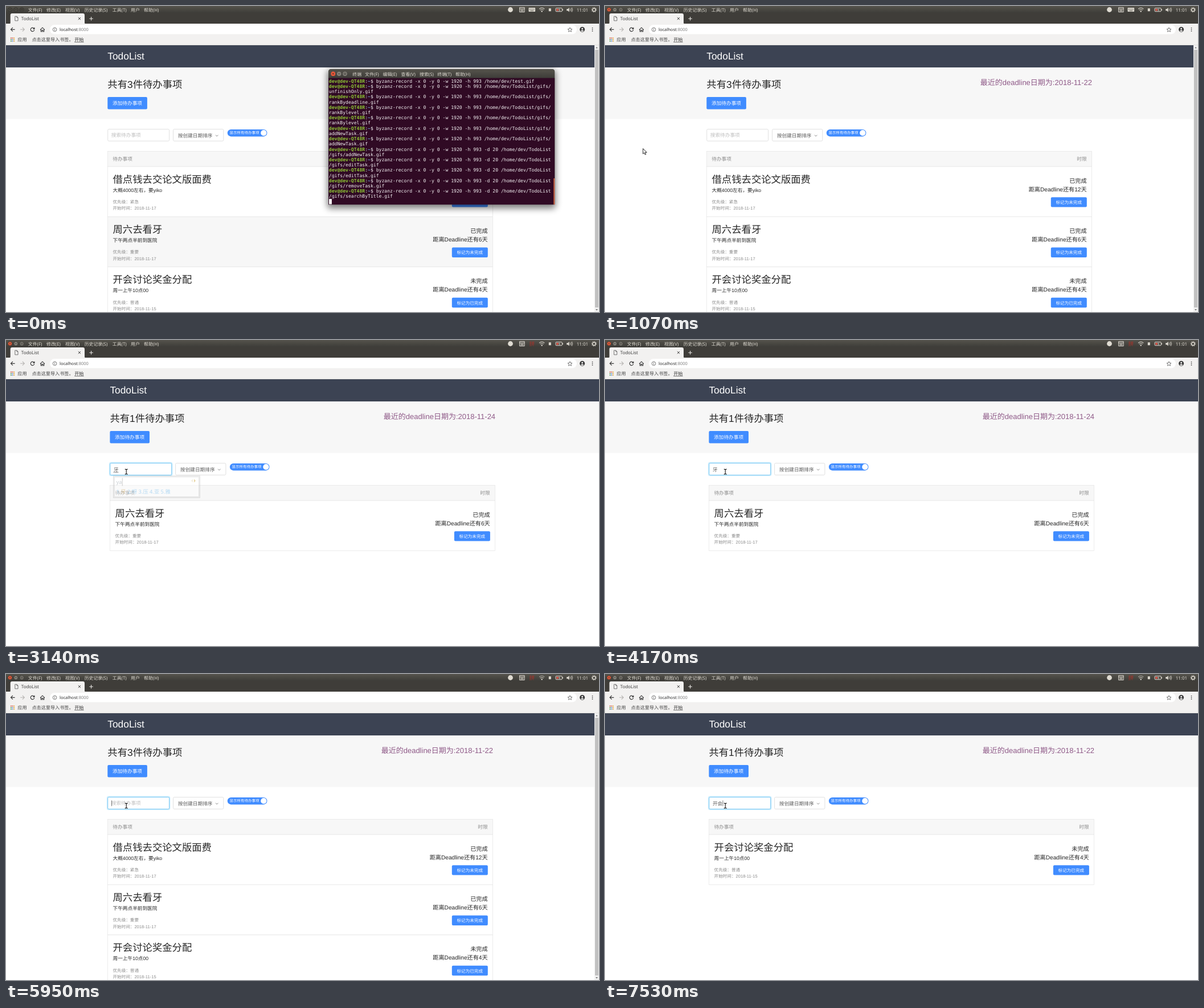
Write an HTML page that moves like this. It is 1041 px wide and 538 px high and loops after 8000 ms.

```html
<!DOCTYPE html>
<html lang="zh-CN">
<head>
<meta charset="utf-8">
<title>TodoList</title>
<style>
html, body { margin: 0; width: 100%; height: 100%; overflow: hidden; background: #fff; }
svg { display: block; width: 100vw; height: 100vh; }
text { white-space: pre; text-rendering: geometricPrecision; font-family: "Liberation Sans", "Noto Sans CJK SC", sans-serif; }
.ui { font-family: "Noto Sans", "Noto Sans CJK SC", sans-serif; }
.mono { font-family: "DejaVu Sans Mono", monospace; }
</style>
</head>
<body>
<svg viewBox="0 0 1041 538" preserveAspectRatio="none">
<defs>
  <linearGradient id="bar" x2="0" y2="1"><stop stop-color="#55534c"/><stop offset="1" stop-color="#3d3c38"/></linearGradient>
  <filter id="blur" x="-10%" y="-15%" width="120%" height="130%"><feGaussianBlur stdDeviation="6"/></filter>
</defs>
<g id="page"></g><g id="frame"></g><g id="tray"></g><g id="term"></g><g id="over"></g>
</svg>
<script>
const LOOP = 8000;
const BLUE = '#408cff', INK = '#262626', GREY = '#8c8c8c', LIGHT = '#dfdbd2';
const $ = id => document.getElementById(id);

const rect = (x, y, w, h, fill, more = '') =>
  `<rect x="${x}" y="${y}" width="${w}" height="${h}" fill="${fill}" ${more}/>`;
const circle = (x, y, r, fill, more = '') =>
  `<circle cx="${x}" cy="${y}" r="${r}" fill="${fill}" ${more}/>`;
const line = (d, stroke, width = 1, more = '') =>
  `<path d="${d}" fill="none" stroke="${stroke}" stroke-width="${width}" ${more}/>`;
const text = (x, y, size, fill, str, more = '') =>
  `<text x="${x}" y="${y}" font-size="${size}" fill="${fill}" ${more}>${str}</text>`;
const END = 'text-anchor="end"', UI = 'class="ui"';
const clamp = v => Math.max(0, Math.min(1, v));
const between = (t, a, b) => t >= a && t < b;

const tasks = [
  { title: '借点钱去交论文版面费', note: '大概4000左右，要yiko', level: '紧急', start: '2018-11-17', done: true, days: 12 },
  { title: '周六去看牙', note: '下午两点半前到医院', level: '重要', start: '2018-11-17', done: true, days: 6 },
  { title: '开会讨论奖金分配', note: '周一上午10点00', level: '普通', start: '2018-11-15', done: false, days: 4 }
];

// What the search box holds over time; `pre` marks unfinished input.
const inputs = [
  { at: 0, word: '', show: [0, 1, 2] },
  { at: 3090, word: '牙', show: [1], pre: true },
  { at: 3640, word: '牙', show: [1] },
  { at: 5050, word: '', show: [0, 1, 2] },
  { at: 6560, word: '看', show: [1], pre: true },
  { at: 6890, word: '开', show: [2], pre: true },
  { at: 7210, word: '开会', show: [2], pre: true },
  { at: 7480, word: '开会', show: [2] }
];
const carets = [[2780, 3090], [3680, 4170], [4780, 5370], [5950, 6560], [7505, 8000]];
const popups = [
  { from: 3090, to: 3680, x: 188, y: 238.5, w: 152, key: 'ya', list: '牙 呀 压 亚 雅', fadeIn: 1, fadeOut: 1 },
  { from: 6560, to: 6890, x: 184.5, y: 237, w: 150.5, key: 'k', list: '看 库 可 框 拷', fadeIn: 1 },
  { from: 6890, to: 7060, x: 188, y: 238.5, w: 152, key: 'kai', list: '开 凯 慨 楷 揩' },
  { from: 7060, to: 7530, x: 188, y: 238.5, w: 195, key: "kai'hui", list: '开会 开回 开 凯 慨', fadeOut: 1 }
];

function row(task, y, fill) {
  const a = tasks.indexOf(task);
  return rect(178.5, y, 676, 88.3, fill, 'stroke="#e4e4e4" stroke-width=".7"') +
    text(187.5, y + 28.5, 17.35, INK, task.title) +
    text(187.5, y + 44.3, 8.67, INK, task.note) +
    text(187.5, y + 64.9, 7.59, GREY, '优先级：' + task.level) +
    text(187.5, y + 76.2, 7.59, GREY, '开始时间：' + task.start) +
    text(845.6, y + 28.3, 10.15, INK, task.done ? '已完成' : '未完成', END) +
    text(845.6, y + 43.3, 10.15, INK, `距离Deadline还有${task.days}天`, END) +
    rect(782.8, y + 54, 63, 17.4, BLUE, 'rx="2"') +
    text(791.5, y + 65.9, 7.59, '#fff', task.done ? '标记为未完成' : '标记为已完成');
}

function page(t) {
  const now = inputs.filter(i => i.at <= t).pop();
  const full = now.show.length > 1;
  const wide = full ? 1033 : 1041;
  const hover = t > 1700, focus = t >= 2550;
  const day = now.show.includes(2) ? 22 : 24;
  const shade = Math.round(247 + 8 * clamp((t - 720) / 210));

  let s = rect(0, 69, 1041, 469, '#fff') + rect(0, 69, wide, 39, '#3c4353') + rect(0, 108, wide, 90.6, '#f7f7f7');
  s += `<g transform="translate(${full ? 0 : 4.1} 0)">`;
  s += text(178.3, 94.4, 17.35, '#fff', 'TodoList') +
    text(178.3, 144.4, 17.35, INK, `共有${now.show.length}件待办事项`) +
    rect(178.3, 160, 69.6, 21.6, BLUE, 'rx="2"') + text(187, 174.4, 8.67, '#fff', '添加待办事项');
  if (t >= 1070) s += text(855, 139.2, 13.01, '#8f5a88', `最近的deadline日期为:2018-11-${day}`, END);

  if (focus) s += rect(177.6, 215.6, 110, 22.8, 'none', 'rx="2.6" stroke="#2db7f5" stroke-opacity=".25" stroke-width="1.6"');
  s += rect(178.7, 216.6, 107.9, 20.8, '#fff', `rx="2" stroke="${hover ? '#57b9f0' : '#d9d9d9'}" stroke-width=".8"`);
  s += now.word ? text(184.8, 230.5, 8.67, '#595959', now.word) : text(184.8, 230.3, 8.67, '#bfbfbf', '搜索待办事项');
  if (now.pre) s += rect(184.4, 232.3, 8.9 * now.word.length, .7, '#555');
  if (carets.some(c => between(t, ...c))) s += rect(185 + 8.75 * now.word.length, 222.3, .7, 10, '#444');

  s += rect(293.5, 216.6, 88.3, 20.8, '#fff', 'rx="2" stroke="#d9d9d9" stroke-width=".8"') +
    text(301.9, 230.6, 8.67, '#595959', '按创建日期排序') +
    line('M368 226.7l2.2 2.4 2.2-2.4', '#777', .8) +
    rect(388.8, 217, 69.6, 12.4, BLUE, 'rx="6.2"') + text(392.5, 225.4, 6.5, '#fff', '显示所有待办事项') +
    circle(452.3, 223.2, 5.1, '#fff');

  s += rect(178.5, 255.3, 676, 26.9, '#f7f7f7', 'stroke="#e4e4e4" stroke-width=".7"') +
    text(187.3, 271.5, 8.67, GREY, '待办事项') + text(845.6, 271.5, 8.67, GREY, '时限', END);
  now.show.forEach((n, i) => {
    const tone = full && n === 1 && t < 930 ? shade : 255;
    s += row(tasks[n], 282.2 + 88.3 * i, `rgb(${tone},${tone},${tone})`);
  });
  s += '</g>';
  if (full) s += rect(1033, 69, 8, 469, '#f1f1f1') + rect(1034, 77, 6, 453, '#c1c1c1') +
    '<path d="M1035 74.3l2-2.4 2 2.4zM1035 533l2 2.4 2-2.4z" fill="#777"/>';
  return s;
}

function menu(xs, y, names) {
  return names.map((n, i) => text(xs[i], y, 7.9, LIGHT, n, UI)).join('');
}

function frame() {
  let s = rect(0, 0, 1041, 31.5, '#3f3d39') + rect(0, 0, 1041, 12.5, 'url(#bar)');
  s += menu([38.8, 71, 104, 137.7, 186.8, 219, 242], 9.9,
    ['文件(F)', '修改(E)', '视图(V)', '历史记录(S)', '工具(T)', '用户', '帮助(H)']);
  s += '<path d="M6 31.5q1.7 0 1.7-2V16q0-3 3-3H135q3 0 3 3v13.5q0 2 1.7 2z" fill="#f2f1f0"/>' +
    rect(0, 31, 1041, 38, '#f2f1f0') + rect(77, 33, 925, 16.6, '#fff', 'rx="8.3"') + rect(0, 68.4, 1041, .6, '#d8d6d3');
  s += line('M15.8 18.3h3.2l2 2v5.6h-5.2zM19 18.3v2h2', '#555', .8) +
    text(26.8, 24.9, 7.9, '#3c3c3c', 'TodoList', UI) +
    line('M126.8 20l4.2 4.2m0-4.2l-4.2 4.2', '#444', 1) + line('M146.3 22.2h6.6m-3.3-3.3v6.6', '#e8e6e2', 1.1);
  s += line('M15.6 41.3H8.6m3.3-3.4l-3.4 3.4 3.4 3.4', '#3a3a3a', 1.2) +
    line('M25.2 41.3h7m-3.3-3.4l3.4 3.4-3.4 3.4', '#b5b3b0', 1.1) +
    line('M49.2 39.4A3.3 3.3 0 1 0 49.8 42M49.9 37.7v2.6h-2.6', '#3a3a3a', 1.2) +
    line('M60 41.8l4-3.9 4 3.9M61.3 41v4h1.8v-2.4h1.8V45h1.8v-4', '#3a3a3a', 1.1);
  s += circle(85.6, 41.4, 3.3, 'none', 'stroke="#555" stroke-width=".8"') +
    rect(85.2, 40.9, .8, 2.3, '#555') + rect(85.2, 39.3, .8, .9, '#555') +
    text(94, 44.3, 7.5, '#2b2b2b', 'localhost<tspan fill="#808080">:8000</tspan>', UI);
  s += line('M990 37.8l1.1 2.6 2.8.2-2.1 1.9.6 2.8-2.4-1.5-2.4 1.5.6-2.8-2.1-1.9 2.8-.2z', '#555', .8) +
    circle(1011.6, 41.3, 4.5, '#3c3c3c') + circle(1011.6, 40, 1.5, '#f2f1f0') +
    '<path d="M1008.8 43.9q2.8-2.6 5.6 0q-2.8 2.2-5.6 0" fill="#f2f1f0"/>';
  for (let i = 0; i < 3; i++) s += circle(1029.5, 38.5 + 2.8 * i, .85, '#444');
  const dots = ['#d9503f', '#d9503f', '#e5a52f', '#4a9a55', '#5585d8', '#e5a52f', '#4a9a55', '#5585d8', '#e5a52f'];
  dots.forEach((c, i) => s += rect(8 + 2.7 * (i % 3), 55.5 + 2.7 * (i / 3 | 0), 1.7, 1.7, c));
  s += text(20.3, 61.9, 8.15, '#444', '应用', UI) + text(45.4, 61.9, 8.15, '#444', '点击这里导入书签。', UI) +
    text(120.2, 61.9, 8.15, '#333', '开始', UI) + rect(120.2, 63, 16.4, .7, '#444');
  return s;
}

function tray(t) {
  const live = t >= 1070;
  let s = '';
  [7, 17.3, 27.7].forEach((x, i) => {
    const fill = live ? (i ? '#85827a' : '#ea5d3c') : '#4b4943';
    s += circle(x, 6.4, 3.6, fill, 'stroke="#2f2e2a" stroke-width=".7"');
    const mark = [`M${x - 1.3} 5.1l2.6 2.6m0-2.6l-2.6 2.6`, `M${x - 1.6} 6.4h3.2`, `M${x - 1.4} 5.2h2.8v2.4h-2.8z`][i];
    s += line(mark, live ? '#3b3935' : '#34332f', .8);
  });
  s += circle(885.5, 6.5, 4.4, LIGHT);
  s += line('M901.6 2.6h8.6v8h-8.6zM901.6 5h8.6M903.2 7h5.4M903.2 8.8h5.4', LIGHT, 1);
  if (t < 2550) {
    s += rect(917.5, 3, 11.6, 7, LIGHT, 'rx="1"');
    s += line('M918.8 5h9M918.8 6.7h9', '#55534c', .8, 'stroke-dasharray="1 .7"') + rect(920.5, 8, 5.6, .8, '#55534c');
  } else s += text(918.6, 10.2, 9.6, '#a8322a', '拼', UI);
  s += line('M936 5.3q4.7-4 9.4 0', LIGHT, 1.1, `opacity="${t < 5770 ? 1 : .65}"`) +
    line('M937.7 7.3q3-2.7 6 0', LIGHT, 1.1) + circle(940.7, 9.4, 1.2, LIGHT);
  s += rect(952.8, 4.2, 4, 5, LIGHT);
  s += rect(965, 3.7, 11.2, 6, 'none', `rx="1" stroke="${LIGHT}" stroke-width="1"`) +
    rect(976.7, 5.4, 1.2, 2.6, LIGHT) + rect(966.4, 5, 3.4, 3.4, '#e0564a') +
    line('M971.8 4.8l-1.3 2.1h2.2l-1.2 2', LIGHT, .8);
  s += `<path d="M984.2 5.2h2l2.5-2.3v7.6l-2.5-2.3h-2z" fill="${LIGHT}"/>` +
    line('M990.1 4.9q1.3 1.8 0 3.6M991.8 3.7q2.2 3 0 6M993.4 2.8q2.6 3.9 0 7.8', LIGHT, .8);
  s += text(1001.8, 9.5, 7.9, LIGHT, '11:01', UI);
  s += circle(1032.3, 6.7, 2.6, 'none', `stroke="${LIGHT}" stroke-width="1.3"`) +
    circle(1032.3, 6.7, 3.8, 'none', `stroke="${LIGHT}" stroke-width="1.3" stroke-dasharray="1.5 1.48"`);
  return s;
}

function terminal(t) {
  if (t >= 1070) return '';
  let s = rect(564, 113, 401, 243, '#000', 'rx="5" opacity=".5" filter="url(#blur)"') +
    '<path d="M566 349V115.5q0-4.5 4.5-4.5H958.7q4.5 0 4.5 4.5V349z" fill="#3d3c38"/>' +
    rect(566.4, 111.4, 396.4, 15.6, 'url(#bar)', 'rx="4"') + rect(566, 126.6, 397.2, 222.6, '#300a24');
  s += circle(574.3, 119.2, 3.9, '#e9593b') + line('M572.9 117.8l2.8 2.8m0-2.8l-2.8 2.8', '#4a2a20', .9);
  s += circle(584.7, 119.2, 3.8, '#85827a') + line('M583 119.2h3.4', '#3b3935', .9);
  s += circle(595, 119.2, 3.8, '#85827a') + line('M593.5 117.9h3v2.6h-3z', '#3b3935', .8);
  s += menu([608.3, 630, 661.5, 693.6, 726, 757.3, 789], 123.2,
    ['终端', '文件(F)', '编辑(E)', '查看(V)', '搜索(S)', '终端(T)', '帮助(H)']);

  const prompt = '<tspan font-weight="bold" fill="#8ec635">dev@dev-QT48R</tspan>:' +
    '<tspan font-weight="bold" fill="#729fcf">~</tspan>$ byzanz-record -x 0 -y 0 -w 1920 -h 993 ';
  const home = '/home/dev/';
  const lines = [prompt + home + 'test.gif'];
  ['unfinishOnly', 'rankBydeadline', 'rankBylevel', 'rankBylevel', 'addNewTask', 'addNewTask']
    .forEach(n => lines.push(prompt + home + 'TodoList/gifs/', n + '.gif'));
  ['addNewTask', 'editTask', 'editTask', 'removeTask', 'searchByTitle']
    .forEach(n => lines.push(prompt + '-d 20 ' + home + 'TodoList', '/gifs/' + n + '.gif'));
  lines.forEach((l, i) => s += text(566.8, 134.7 + 9.218 * i, 8.1, '#f4f1f3', l, 'class="mono"'));
  if (t < 560) s += rect(567, 339.2, 4.9, 9.3, '#fff');
  return s + rect(961.4, 303, 1.7, 46, '#dd6a43');
}

function box(x, y, w, h) {
  return rect(x, y, w, h, '#d9d9d9', 'stroke="#a9a9a9" stroke-width=".8"') +
    rect(x + 2, y + 2, w - 4, h - 4, '#fff', 'stroke="#b5b5b5" stroke-width=".7"');
}

function popup(p, t) {
  const seen = Math.min(p.fadeIn ? clamp((t - p.from) / 130) : 1, p.fadeOut ? clamp((p.to - t) / 50) : 1);
  const { x, y, w } = p;
  const items = p.list.split(' ').map((c, i) =>
    `${i + 1}.` + (i ? c : `<tspan fill="#b8841c">${c}</tspan>`)).join(' ');
  const caret = x + 6 + p.key.length * 4.7;
  return `<g opacity="${seen.toFixed(3)}">` + box(x + .4, y + .4, w, 38.6) +
    text(x + 5.5, y + 14.2, 9.3, '#7d8a94', p.key, UI) + rect(caret + .4, y + 4, .8, 14, '#666') +
    `<path d="M${x + w - 12} ${y + 6}v6l-3-3z" fill="#e3d3a5"/>` +
    `<path d="M${x + w - 10} ${y + 6}v6l3-3z" fill="#c79a1c"/>` +
    text(x + 5.5, y + 31.6, 9.3, '#4faeef', items, UI) + '</g>';
}

function mouse(t) {
  if (t < 790) return '';
  const step = t < 1240 ? 0 : Math.min(13, Math.floor((t - 1240) / 42.5) + 1);
  const k = step / 13, e = k * k * (3 - 2 * k);
  const x = 66.7 + 144.5 * e, y = 250.7 - 19.2 * e;
  if (x > 179 && y < 238) {
    const beam = `M${x - 2.4} ${y - 4.4}q2.4 0 2.4 1.2v6.4q0 1.2-2.4 1.2M${x + 2.4} ${y - 4.4}q-2.4 0-2.4 1.2v6.4q0 1.2 2.4 1.2`;
    return line(beam, '#fff', 2.2) + line(beam, '#111', 1.1);
  }
  return `<path d="M${x} ${y}v9.2l2.1-1.9 1.5 3.4 1.6-.7-1.5-3.3h2.9z" fill="#fff" stroke="#111" stroke-width=".9"/>`;
}

function over(t) {
  let s = '';
  if (between(t, 2550, 2920)) {
    const seen = 1 - clamp((t - 2740) / 180);
    s += `<g opacity="${seen.toFixed(3)}">` + box(370.8, 237.4, 64.2, 22.2) +
      text(375.8, 252.4, 9.3, '#4a8fd6', '拼音', UI) + '</g>';
  }
  popups.forEach(p => { if (between(t, p.from, p.to)) s += popup(p, t); });
  return s + mouse(t);
}

const layers = { page, tray, term: terminal, over };
const drawn = {};
function draw(t) {
  for (const id in layers) {
    const s = layers[id](t);
    if (s !== drawn[id]) $(id).innerHTML = drawn[id] = s;
  }
}

$('frame').innerHTML = frame();
const start = performance.now();
function tick() {
  draw((performance.now() - start) % LOOP);
  requestAnimationFrame(tick);
}
tick();
</script>
</body>
</html>
```
